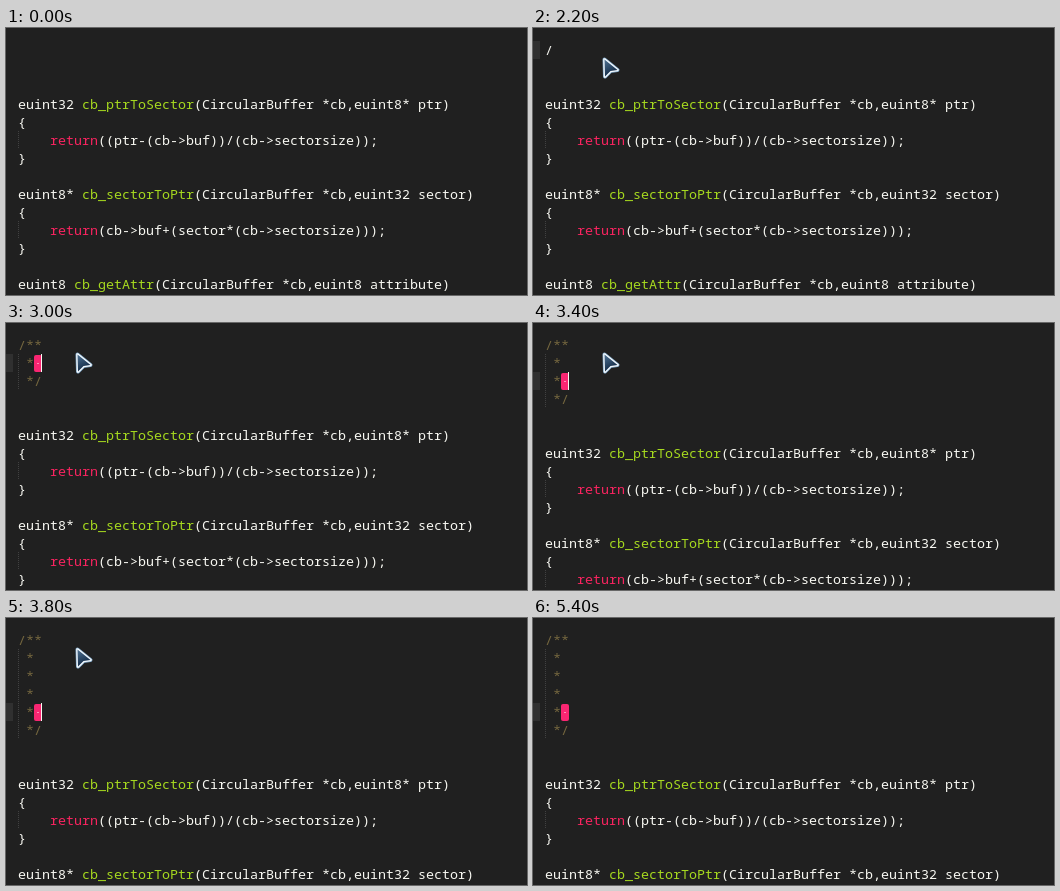
These frames come from a looping animation (521 px wide and 267 px high, 5800 ms). An HTML page with a canvas:

```html
<!DOCTYPE html>
<html lang="en">
<head>
<meta charset="utf-8">
<title>Comment block typing</title>
<style>
  html, body { margin: 0; width: 100%; height: 100%; overflow: hidden; background: #202020; }
  canvas { display: block; }
</style>
</head>
<body>
<canvas id="stage" width="521" height="267"></canvas>
<script>
const ctx = document.getElementById('stage').getContext('2d');
const LOOP = 5800, LEFT = 12, TOP = 13, CHAR = 8, LINE = 18;
const COLOR = {
  bg: '#202020', plain: '#f8f8f2', name: '#a6d91f', key: '#f92460',
  comment: '#75673f', space: '#f92672', guide: '#414141', gutter: '#303030'
};

// Tokens: @name@ is a function name, #word# a keyword
const CODE = [
  'euint32 @cb_ptrToSector@(CircularBuffer *cb,euint8* ptr)',
  '{',
  '    #return#((ptr-(cb->buf))/(cb->sectorsize));',
  '}',
  '',
  'euint8* @cb_sectorToPtr@(CircularBuffer *cb,euint32 sector)',
  '{',
  '    #return#(cb->buf+(sector*(cb->sectorsize)));',
  '}',
  '',
  'euint8 @cb_getAttr@(CircularBuffer *cb,euint8 attribute)'
];

// Each step: time, caret opacity
const CARET = [
  [0, 0], [1000, 0.5], [1200, 1], [1600, 0], [1800, 1], [2200, 0], [2400, 1],
  [2800, 0.3], [3000, 1], [4200, 0], [4400, 0.5], [4600, 1],
  [5000, 0.5], [5200, 0.25], [5400, 0]
];
// Time, typed characters of the opening mark
const TYPED = [[0, 0], [1800, 1], [2400, 2], [2600, 3]];
// Time, caret row
const ROW = [[0, 0], [2800, 1], [3400, 2], [3600, 3], [3800, 4]];
// Time, pointer left, pointer top
const POINTER = [
  [0], [200, 392, 136], [400, 114, 62], [600, 70, 43], [800, 69, 29],
  [4600, 208, 94], [5000]
];

const at = (steps, t) => steps.filter(s => s[0] <= t).pop().slice(1);
const rowTop = row => TOP + row * LINE;

function text(str, col, row, color) {
  ctx.fillStyle = color;
  ctx.fillText(str, LEFT + col * CHAR, rowTop(row) + 14);
}

function guide(row) {
  ctx.fillStyle = COLOR.guide;
  for (let y = rowTop(row); y < rowTop(row + 1); y += 2) ctx.fillRect(LEFT, y, 1, 1);
}

function codeLine(line, row, commented) {
  if (line.startsWith(' ')) guide(row);
  let col = 0;
  for (const part of line.split(/(@\w+@|#\w+#)/)) {
    const str = part.replace(/[@#]/g, '');
    const color = commented ? COLOR.comment
      : part[0] === '@' ? COLOR.name
      : part[0] === '#' ? COLOR.key : COLOR.plain;
    text(str, col, row, color);
    col += str.length;
  }
}

function trailingSpace(row) {
  const x = LEFT + 2 * CHAR, y = rowTop(row);
  ctx.fillStyle = COLOR.space;
  ctx.beginPath();
  ctx.roundRect(x, y + 1, CHAR, LINE - 1, 2);
  ctx.fill();
  ctx.fillStyle = '#ff8db5';
  ctx.fillRect(x + 3, y + 9, 2, 1);
}

function pointer(x, y) {
  ctx.save();
  ctx.translate(x, y);
  ctx.beginPath();
  ctx.moveTo(2.5, 2.5);
  ctx.lineTo(15.5, 13);
  ctx.lineTo(8.5, 14);
  ctx.lineTo(3, 19.5);
  ctx.closePath();
  ctx.lineJoin = 'round';
  ctx.strokeStyle = '#7fa6c6';
  ctx.lineWidth = 4;
  ctx.stroke();
  ctx.strokeStyle = '#f4faff';
  ctx.lineWidth = 2.6;
  ctx.stroke();
  const core = ctx.createLinearGradient(3, 3, 10, 17);
  core.addColorStop(0, '#4c6f90');
  core.addColorStop(1, '#142c48');
  ctx.fillStyle = core;
  ctx.fill();
  ctx.restore();
}

function draw(t) {
  const [alpha] = at(CARET, t), [typed] = at(TYPED, t), [row] = at(ROW, t);
  const [px, py] = at(POINTER, t);

  ctx.fillStyle = COLOR.bg;
  ctx.fillRect(0, 0, 521, 267);
  if (t >= 1000) {
    ctx.fillStyle = COLOR.gutter;
    ctx.fillRect(0, rowTop(row), 7, LINE);
  }

  ctx.font = '13.3333px "Noto Sans Mono", "Liberation Mono", monospace';
  text('/**'.slice(0, typed), 0, 0, typed > 1 ? COLOR.comment : COLOR.plain);
  if (row) {
    for (let r = 1; r <= row + 1; r++) {
      guide(r);
      text(r > row ? '*/' : '*', 1, r, COLOR.comment);
    }
    trailingSpace(row);
  }

  const first = row ? row + 4 : 3;
  CODE.forEach((line, i) => {
    if (first + i < 14) codeLine(line, first + i, typed > 1 && !row);
  });

  ctx.globalAlpha = alpha;
  ctx.fillStyle = COLOR.plain;
  ctx.fillRect(LEFT - 1 + typed * CHAR, rowTop(row), 1, LINE);
  ctx.globalAlpha = 1;
  if (px !== undefined) pointer(px, py);
}

const start = performance.now();
function tick() {
  draw((performance.now() - start) % LOOP);
  requestAnimationFrame(tick);
}
tick();
</script>
</body>
</html>
```
